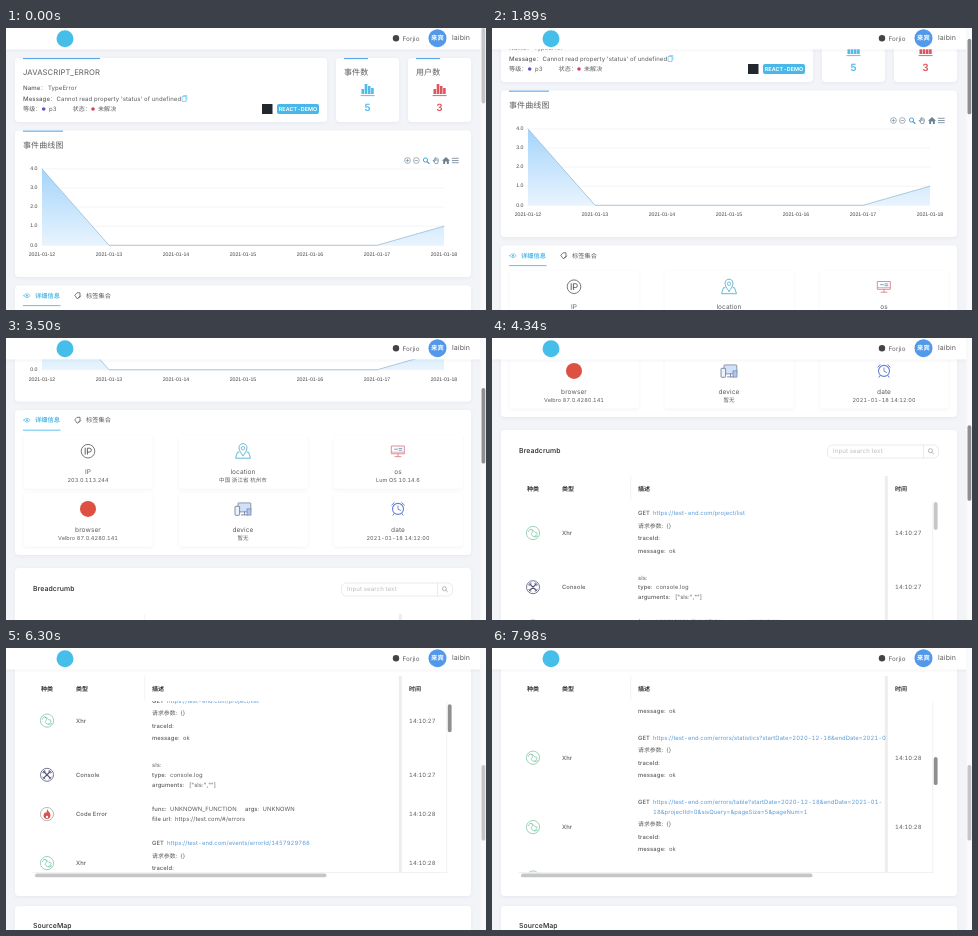
An HTML page that plays this animation: 480 px wide and 282 px high, repeating every 8 s.

```html
<!DOCTYPE html>
<html lang="zh">
<head>
<meta charset="utf-8">
<title>Error dashboard</title>
<style>
  html, body { margin: 0; width: 100%; height: 100%; overflow: hidden; background: #f3f4f8; }
  svg { display: block; width: 480px; height: 282px; }
  text {
    font-family: Inter, "Noto Sans CJK SC", "Noto Sans CJK", sans-serif; white-space: pre;
    font-variant-numeric: tabular-nums; letter-spacing: .015em; text-rendering: geometricPrecision;
  }
  .axis text { font-family: "Liberation Sans", Arial, sans-serif; letter-spacing: 0; }
  .line { fill: none; stroke-linecap: round; stroke-linejoin: round; }
</style>
</head>
<body>
<svg id="stage" viewBox="0 0 480 282" xmlns="http://www.w3.org/2000/svg"></svg>
<script>
const BLUE = '#4fbbe9', GREY = '#5c5c5e', LINK = '#5b9bd5';

// y is the vertical middle of the line of text
const text = (x, y, str, { size = 5.85, fill = GREY, weight = 400, anchor = 'start' } = {}) =>
  `<text x="${x}" y="${y + size * 0.36}" font-size="${size}" fill="${fill}" font-weight="${weight}" text-anchor="${anchor}">${str.replace(/&/g, '&amp;')}</text>`;
const rect = (x, y, w, h, fill, extra = '') =>
  `<rect x="${x}" y="${y}" width="${w}" height="${h}" fill="${fill}" ${extra}/>`;
const circle = (x, y, r, fill, extra = '') =>
  `<circle cx="${x}" cy="${y}" r="${r}" fill="${fill}" ${extra}/>`;
const path = (d, stroke, width = 0.8, extra = '') =>
  `<path class="line" d="${d}" stroke="${stroke}" stroke-width="${width}" ${extra}/>`;
const at = (x, y, body) => `<g transform="translate(${x} ${y})">${body}</g>`;
const card = (x, y, w, h) => rect(x, y, w, h, '#fff', 'rx="4" filter="url(#soft)"');
const accent = (x, y, w) => rect(x, y - 0.4, w, 1.1, '#5aa5e8');
const ring = (r, stroke, width = 0.8) => circle(0, 0, r, 'none', `stroke="${stroke}" stroke-width="${width}"`);

const defs = `<defs>
  <filter id="soft" x="-10%" y="-20%" width="120%" height="150%"><feDropShadow dx="0" dy="1" stdDeviation="1.5" flood-color="#5a6080" flood-opacity=".08"/></filter>
  <linearGradient id="area" x1="0" y1="0" x2="0" y2="1"><stop stop-color="#a4d4fb"/><stop offset="1" stop-color="#e8f4fe"/></linearGradient>
  <clipPath id="cells"><rect x="27" y="486.5" width="367.5" height="171.5"/></clipPath>
  <clipPath id="times"><rect x="396" y="486.5" width="45" height="171.5"/></clipPath>
</defs>`;

function summary() {
  const label = { size: 6.1, weight: 500 }, body = { size: 6 };
  const barIcon = color => [[-6, 5], [-2.8, 10], [0.4, 8], [3.6, 6]]
    .map(([x, h]) => rect(x, 4 - h, 2.6, h, color)).join('') + path('M-6.5 5.6H6.7', color, 0.9);
  const counter = (x, title, value, color) =>
    card(x, 30, 63, 64) + accent(x + 8, 30.4, 24) +
    text(x + 8, 44, title, { size: 8 }) + at(x + 31.5, 62, barIcon(color)) +
    text(x + 31.5, 79, value, { size: 10, fill: color, weight: 600, anchor: 'middle' });
  return card(9, 30, 312, 64) + accent(17, 30.4, 77) +
    text(17, 44, 'JAVASCRIPT_ERROR', { size: 7.7 }) +
    text(17, 60, 'Name：', label) + text(42, 60, 'TypeError', body) +
    text(17, 70.5, 'Message：', label) +
    text(50.5, 70.5, "Cannot read property 'status' of undefined", body) +
    path('M176.5 68.5h3.5v5h-3.5zM177.5 67.5h3.3v4.5', BLUE, 0.6) +
    text(17, 81, '等级：', label) + circle(37.7, 81, 1.8, '#6a4fc0') + text(43, 81, 'p3', body) +
    text(66.5, 81, '状态：', label) + circle(87, 81, 1.8, '#d9405f') + text(92, 81, '未解决', body) +
    rect(256, 76, 10.5, 10, '#23272e') + rect(271, 76, 42, 10, '#49b8e8', 'rx="2"') +
    text(292, 81, 'REACT-DEMO', { size: 5.4, fill: '#fff', weight: 600, anchor: 'middle' }) +
    counter(330, '事件数', '5', BLUE) + counter(402, '用户数', '3', '#e0545c');
}

function chart() {
  const x = i => 36 + i * 67, y = v => 217.3 - v * 19.1;
  const days = [4, 0, 0, 0, 0, 0, 1];
  const curve = 'M' + days.map((v, i) => `${x(i)} ${y(v)}`).join('L');
  const small = { size: 5.2, fill: '#444' };
  const grid = [0, 1, 2, 3, 4].map(v => path(`M36 ${y(v)}H438`, '#ececef', 0.6) +
    text(31.5, y(v) - 0.6, v.toFixed(1), { ...small, anchor: 'end' })).join('');
  const dates = days.map((_, i) => text(x(i), 226.5, `2021-01-${12 + i}`, { ...small, anchor: 'middle' })).join('');
  const tool = '#6e8192';
  const tools =
    at(401.5, 132.5, ring(2.9, tool, 0.6) + path('M-1.4 0H1.4M0-1.4V1.4', tool, 0.6)) +
    at(410.3, 132.5, ring(2.9, tool, 0.6) + path('M-1.4 0H1.4', tool, 0.6)) +
    at(419.5, 132, ring(2.1, '#3a9bd8', 0.9) + path('M1.6 1.6L3.5 3.5', '#3a9bd8', 1.1)) +
    at(430, 132.5, path('M-1.6 .8V-2M-.4 0V-3M.9 0V-2.6M2.2.6V-1.6M-1.6.8L-3-.4L-.8 3H1.6L2.2.6', tool, 0.7)) +
    at(440, 132.5, `<path d="M-4 .3L0-3.5L4 .3H2.8V3.4H.9V1H-.9V3.4H-2.8V.3z" fill="${tool}"/>`) +
    at(449.3, 132.5, path('M-3-2.2H3M-3 0H3M-3 2.2H3', tool, 0.8));
  return card(9, 102.6, 456, 146.4) + accent(17, 103, 40) +
    text(17, 117, '事件曲线图', { size: 8 }) + tools +
    `<g class="axis">${grid}<path d="${curve}V${y(0)}H36z" fill="url(#area)"/>` +
    path(curve, '#9bbcd3', 0.8) + dates + '</g>';
}

const infoIcons = {
  ip: ring(6.8, '#555') + path('M-2.8-3V3M-.6 3V-3H1.4A1.9 1.9 0 0 1 1.4 .9H-.6', '#555', 0.9),
  pin: path('M0 4.5C-6-2-4.5-7.5 0-7.5S6-2 0 4.5zM-4 1H-5.5L-7.5 7H7.5L5.5 1H4', '#55b4cf', 0.9) + at(0, -3, ring(1.7, '#55b4cf')),
  screen: path('M-6.3-5.2H6.3V2.6H-6.3zM0 2.6V5.3M-3 5.5H3', '#d9828b', 0.9) + path('M-6 1H6', '#d9828b', 0.7) +
    path('M-3.5-2H-.5M1-2.8H3.8M1-1H3.8', '#6c7fae', 0.8),
  disc: circle(0, 0, 8, '#dc5142'),
  devices: rect(-5, -6, 12.8, 9, '#cfe2f7', 'rx=".6" stroke="#66728f" stroke-width=".7"') + path('M1.5 3V5.6M-1.5 6H4.5', '#66728f') +
    rect(-8, -2.6, 4.6, 9, '#eaf3fc', 'rx=".7" stroke="#66728f" stroke-width=".8"') + rect(4, 0, 4, 6.2, '#a9c9ef', 'stroke="#66728f" stroke-width=".6"'),
  clock: ring(5.5, '#6683d3', 1.1) + path('M0-3V.4L2.6 1.5', '#6683d3', 0.9) + path('M-6.3-3.8L-3.8-6.2M6.3-3.8L3.8-6.2M-4 4.8L-5 6.3M4 4.8L5 6.3', '#6683d3', 1)
};

function details() {
  const tiles = [
    ['ip', 'IP', '203.0.113.244'], ['pin', 'location', '中国 浙江省 杭州市'], ['screen', 'os', 'Lum OS 10.14.6'],
    ['disc', 'browser', 'Velbro 87.0.4280.141'], ['devices', 'device', '暂无'], ['clock', 'date', '2021-01-18 14:12:00']
  ].map(([icon, name, value], i) => {
    const x = 18 + (i % 3) * 155, y = 283 + Math.floor(i / 3) * 57.7;
    return rect(x, y, 128.5, 53.3, '#fff', 'rx="3" filter="url(#soft)"') + at(x + 64, y + 15.7, infoIcons[icon]) +
      text(x + 64, y + 36, name, { size: 6.5, anchor: 'middle' }) +
      text(x + 64, y + 45, value, { size: 5.5, anchor: 'middle' });
  }).join('');
  return card(9, 257.5, 456, 145) +
    path('M17.8 267.7Q21 263.7 24.2 267.7Q21 271.7 17.8 267.7z', BLUE, 0.7) + circle(21, 267.7, 1, BLUE) +
    text(29, 267.7, '详细信息', { size: 6.2, fill: BLUE, weight: 600 }) + rect(17, 277.2, 37.5, 0.9, BLUE) +
    path('M69 267L71 264.8H74V268L71.5 270.5zM72.5 270.3L74.8 268', GREY, 0.8) +
    text(80, 267.7, '标签集合', { size: 6.2 }) + tiles;
}

const rowIcons = {
  Xhr: ring(6.6, '#80c7a8', 0.8) + path('M-4.5-1.5C-4-5 0-4-.5-1.5S-3 1-1 2.5S2 4.5 4.5 3M-2-3.5C1-3.5 1 0 3-.5S4 3 1.5 3.5', '#80c7a8', 0.8),
  Console: ring(6.5, '#55557a', 0.8) + path('M-3.3-3.3L3.3 3.3M3.3-3.3L-3.3 3.3', '#55557a', 1.2) +
    path('M-4.4-2.2A1.6 1.6 0 0 0-2.2-4.4M4.4-2.2A1.6 1.6 0 0 1 2.2-4.4M-4.2 2.2L-2.2 4.2M4.2 2.2L2.2 4.2', '#55557a', 0.9),
  'Code Error': ring(6.6, '#999', 0.7) + '<path d="M.3-5C1-2.5 4-1 3.4 2C3 4.4 1.5 5 0 5S-3.6 4-3.5 1.5C-3.4 0-2.4-.8-2-2L-1-.8C0-2-.3-3.5.3-5z" fill="#d9534a"/>' + circle(0, 2.8, 1.2, '#fff')
};

const field = (y, name, value, x) => text(146, y, name, { weight: 500 }) + text(x, y, value);

function request(y, lines) {
  const links = lines.map((s, i) => text(161, y + i * 9.6, s, { fill: LINK })).join('');
  const top = y + (lines.length - 1) * 9.6;
  return text(146, y, 'GET', { weight: 500 }) + links +
    field(top + 12.5, '请求参数:', '{}', 174.5) + field(top + 25, 'traceId:', '', 0) + field(top + 37.4, 'message:', 'ok', 177);
}

const span = 'startDate=2020-12-18&endDate=2021-01-';
const site = 'https://test-end.com/';
const xhr = (y, sec, ...lines) => ({ kind: 'Xhr', mid: y + 20 + (lines.length - 1) * 5, sec, body: request(y, lines) });
const rows = [
  xhr(498.5, 27, site + 'project/list'),
  { kind: 'Console', mid: 572.7, sec: 27, body: text(146, 563, 'sls:') + field(572.7, 'type:', 'console.log', 164) + field(582.4, 'arguments:', '["sls:",""]', 183) },
  { kind: 'Code Error', mid: 612, sec: 28, body: field(607, 'func:', 'UNKNOWN_FUNCTION', 164) +
      text(239, 607, 'args:', { weight: 500 }) + text(256.5, 607, 'UNKNOWN') + field(616.8, 'file url:', 'https://test.com/#/errors', 169) },
  xhr(641, 28, site + 'events/errorId/1457929768'),
  xhr(705.5, 28, `${site}project_tag/label?${span}18`),
  xhr(770, 28, `${site}errors/chart/project?${span}18`),
  xhr(834.2, 28, `${site}errors/statistics?${span}18`),
  xhr(898.6, 28, `${site}errors/table?${span}`, '18&projectId=0&sisQuery=&pageSize=5&pageNum=1'),
  { kind: 'Xhr', mid: 974, sec: 28, body: '', bare: true }
];

function breadcrumb() {
  const head = { size: 6, fill: '#333', weight: 600 };
  const left = rows.map(r => at(41, r.mid, rowIcons[r.kind]) +
    (r.bare ? '' : text(70, r.mid, r.kind, { weight: 500 })) + r.body).join('');
  const right = rows.map(r => text(403, r.mid, `14:10:${r.sec}`)).join('');
  return card(9, 415.5, 456, 266) +
    text(27, 436.5, 'Breadcrumb', { size: 6.9, fill: '#222', weight: 500 }) +
    rect(335.5, 430.5, 111, 13, '#fff', 'rx="5" stroke="#e2e2e5" stroke-width=".7"') + path('M431.5 430.5v13', '#e2e2e5', 0.7) +
    text(341, 436.8, 'Input search text', { size: 6.1, fill: '#bdbdc0' }) +
    at(438.4, 436.2, ring(2, '#999', 0.7) + path('M1.5 1.5L3.2 3.2', '#999', 0.7)) +
    [[35, '种类'], [70, '类型'], [146, '描述'], [403, '时间']].map(([x, s]) => text(x, 474.5, s, head)).join('') +
    path('M138.7 462V486', '#ededee', 0.6) + rect(392.8, 461.5, 3, 196.5, '#ededee') +
    `<g clip-path="url(#cells)"><g class="rows">${left}</g></g><g clip-path="url(#times)"><g class="rows">${right}</g></g>` +
    path('M440.7 487V658M27 658H441', '#ececee', 0.7) +
    rect(29, 659, 291.5, 3.8, '#c6c6c8', 'rx="1.9"') +
    '<rect id="innerThumb" x="441.8" y="487.5" width="3.8" height="28" rx="1.9"/>';
}

const sourceMap = () => card(9, 691.5, 456, 120) +
  text(27, 711.3, 'SourceMap', { size: 6.9, fill: '#222', weight: 500 });

const header = () => rect(0, 0, 474.5, 21.3, '#fff', 'filter="url(#soft)"') +
  circle(59, 10.8, 8.5, '#45bfe9') +
  circle(390, 10.3, 3.2, '#444') + text(396.5, 10.3, 'Forjio', { size: 6.3 }) +
  circle(431.5, 10.2, 9, '#5299ea') + text(431.5, 10.2, '来宾', { size: 6.3, fill: '#fff', weight: 600, anchor: 'middle' }) +
  text(446, 9.8, 'laibin', { size: 7 });

const stage = document.getElementById('stage');
stage.innerHTML = defs + rect(0, 0, 480, 282, '#f3f4f8') +
  `<g id="page">${summary()}${chart()}${details()}${breadcrumb()}${sourceMap()}</g>` + header() +
  rect(474.5, 0, 5.5, 282, '#fafafb') + '<rect id="outerThumb" x="475.5" width="3.8" height="75.5" rx="1.9"/>';

const page = document.getElementById('page');
const outerThumb = document.getElementById('outerThumb');
const innerThumb = document.getElementById('innerThumb');
const rowGroups = document.querySelectorAll('.rows');

// Keys are [time, value]; slopes are limited so the curve never overshoots
function follow(keys, t) {
  const last = keys.length - 1;
  if (t <= keys[0][0]) return keys[0][1];
  if (t >= keys[last][0]) return keys[last][1];
  const rate = i => (keys[i + 1][1] - keys[i][1]) / (keys[i + 1][0] - keys[i][0]);
  const slope = i => {
    if (i === 0 || i === last) return 0;
    const a = rate(i - 1), b = rate(i);
    return a * b > 0 ? 2 * a * b / (a + b) : 0;
  };
  const i = keys.findIndex(k => k[0] > t) - 1;
  const [t0, v0] = keys[i], [t1, v1] = keys[i + 1];
  const d = t1 - t0, u = (t - t0) / d, w = 1 - u;
  return v0 * w * w * (1 + 2 * u) + v1 * u * u * (3 - 2 * u) + d * u * w * (slope(i) * w - slope(i + 1) * u);
}

const pageScroll = [[1330, 0], [1890, 40], [3010, 174], [3290, 174], [3500, 185.5], [4340, 323.5], [5040, 415], [5530, 433.5]];
const rowScroll = [[6190, 0], [6300, 12.4], [7420, 186.5], [7980, 311], [8050, 325]];

function render(time) {
  const t = Math.floor(time / 70) * 70;
  const scroll = follow(pageScroll, t), inner = follow(rowScroll, t < 6300 ? 0 : t);
  page.setAttribute('transform', `translate(0 ${-scroll})`);
  rowGroups.forEach(g => g.setAttribute('transform', `translate(0 ${-inner})`));
  outerThumb.setAttribute('y', scroll * 0.27);
  outerThumb.setAttribute('fill', t >= 1120 && t < 5530 ? '#8f8f92' : '#c6c6c8');
  innerThumb.setAttribute('y', 487.5 + inner * 0.177);
  innerThumb.setAttribute('fill', t >= 5880 ? '#8f8f92' : '#c6c6c8');
}

const start = performance.now();
function tick() {
  render((performance.now() - start) % 8000);
  requestAnimationFrame(tick);
}
tick();
</script>
</body>
</html>
```
